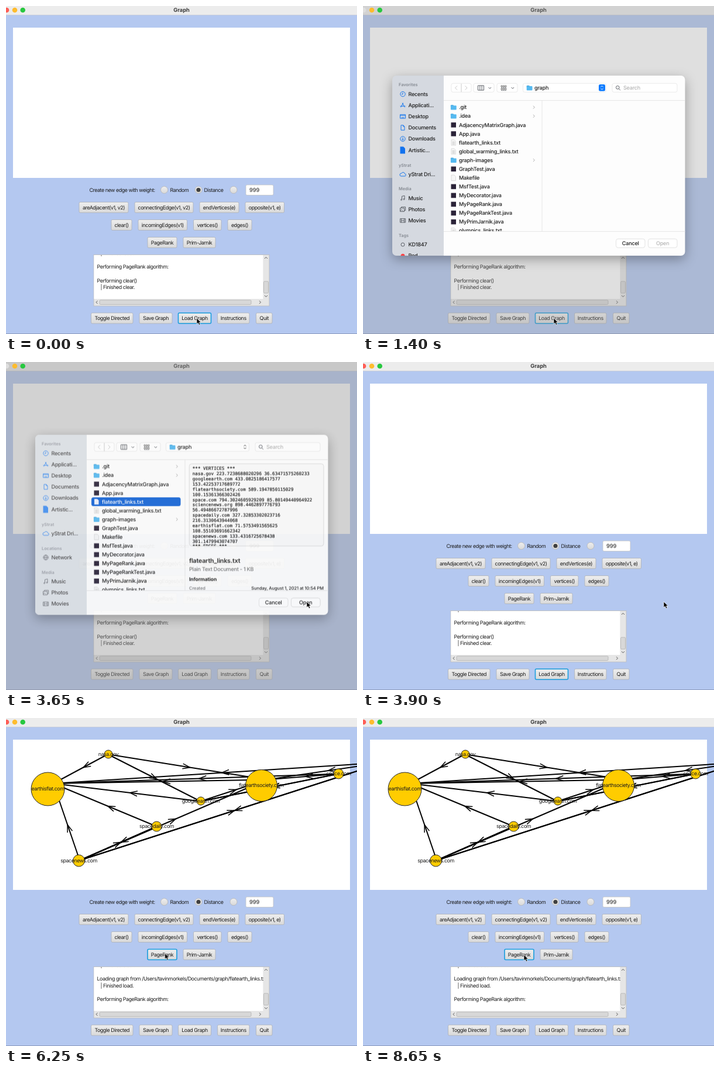
Recreate the animation shown at these times as an HTML page. Size 600 px wide and 561 px high, loop 8.7 s.

```html
<!DOCTYPE html>
<html lang="en">
<head>
<meta charset="utf-8">
<title>Graph</title>
<style>
html, body { margin: 0; width: 100%; height: 100%; overflow: hidden; background: #b4c8f0; }
svg { display: block; width: 600px; height: 561px; }
text { font-family: Inter, Roboto, sans-serif; text-rendering: geometricPrecision; white-space: pre; fill: #1c1c1c; }
.ui { font-size: 8.9px; letter-spacing: -.45px; }
.mac { font-size: 9.1px; letter-spacing: -.25px; font-weight: 500; }
.field { font-size: 9.3px; }
.title { font-size: 9.3px; font-weight: 700; fill: #3c3c3c; }
.head { font-size: 7.3px; font-weight: 600; fill: #858a92; }
.mono { font: 7.55px "DejaVu Sans Mono", "Liberation Mono", monospace; fill: #111; stroke: #111; stroke-width: .18; }
.name { font-size: 10.5px; font-weight: 700; letter-spacing: -.2px; fill: #333; }
.info { font-size: 8.5px; font-weight: 700; letter-spacing: -.1px; }
.small { font-size: 7.5px; letter-spacing: -.1px; font-weight: 500; }
.grey { fill: #777; }
.pale { fill: #b4b4b4; }
.white { fill: #fff; }
.blue { fill: none; stroke: #1677ee; }
.dark { fill: none; stroke: #5c6067; }
.edge { fill: none; stroke: #000; stroke-width: 2; }
.barb { fill: none; stroke: #000; stroke-width: 1.5; }
.node { fill: #ffcc00; stroke: #222; stroke-width: 1; }

#cursor, #dialog, #dim, #pane, #close, #loadFocus, #rankFocus, #log, #edges, #plain, #ranked,
#network, #media, #picked, #active, #inactive, #openOn {
  animation: 8.7s step-end infinite;
}
#dialog { animation-name: sheet; animation-timing-function: linear; filter: drop-shadow(0 6px 10px rgba(0,0,0,.32)); }
#dim { animation-name: dim; animation-timing-function: linear; }
#pane { animation-name: pane; animation-timing-function: linear; }
#cursor { animation-name: cursor; animation-timing-function: ease-in-out; }
#close { animation-name: close; }
#loadFocus { animation-name: loadFocus; }
#rankFocus, #ranked { animation-name: ranked; }
#plain { animation-name: plain; }
#edges { animation-name: loaded; }
#log { animation-name: log; }
#network { animation-name: network; }
#media { animation-name: media; }
#picked { animation-name: picked; }
#openOn { animation-name: openOn; }
#active { animation-name: active; }
#inactive { animation-name: inactive; }

@keyframes sheet {
  0%, 13.218% { opacity: 0; transform: translateY(-18px); }
  16.092% { opacity: 1; transform: translateY(-8px); }
  18.391%, 41.379% { opacity: 1; transform: none; }
  41.954% { opacity: .91; transform: translateY(-2.5px); }
  44.253%, 100% { opacity: 0; transform: translateY(-12.5px); }
}
@keyframes dim {
  0%, 13.218% { opacity: 0; }
  18.391%, 41.379% { opacity: .54; }
  44.253%, 100% { opacity: 0; }
}
@keyframes pane { 0%, 41.379% { opacity: 1; } 44.253%, 100% { opacity: 0; } }
@keyframes cursor {
  0%, 17.241% { transform: translate(326px, 534px); }
  26.437%, 31.034% { transform: translate(217px, 244px); }
  39.08%, 45.977% { transform: translate(514px, 410px); }
  55.172%, 62% { transform: translate(272px, 403px); }
  72.414% { transform: translate(271.5px, 402.5px); }
  78%, 99.5% { transform: translate(275px, 405px); }
  100% { transform: translate(326px, 534px); }
}
@keyframes close { 0% { fill: #ff5f57; } 13.218% { fill: #dedede; } 44.253%, 100% { fill: #ff5f57; } }
@keyframes loadFocus { 0% { opacity: 1; } 16.667% { opacity: 0; } 44.253% { opacity: 1; } 63.218%, 100% { opacity: 0; } }
@keyframes loaded { 0% { opacity: 0; } 45.402%, 100% { opacity: 1; } }
@keyframes plain { 0% { opacity: 0; } 45.402% { opacity: 1; } 63.218%, 100% { opacity: 0; } }
@keyframes ranked { 0% { opacity: 0; } 63.218%, 100% { opacity: 1; } }
@keyframes log {
  0% { transform: none; }
  45.402% { transform: translateY(-35.1px); }
  63.218%, 100% { transform: translateY(-58.5px); }
}
@keyframes network { 0% { opacity: 0; } 20.69%, 100% { opacity: 1; } }
@keyframes media { 0% { transform: translateY(-41.3px); } 20.69%, 100% { transform: none; } }
@keyframes picked { 0% { opacity: 0; } 30.115%, 100% { opacity: 1; } }
@keyframes openOn { 0% { opacity: 0; } 30.115% { opacity: 1; } 41.379%, 100% { opacity: 0; } }
@keyframes active { 0% { opacity: 1; } 41.379%, 100% { opacity: 0; } }
@keyframes inactive { 0% { opacity: 0; } 41.379%, 100% { opacity: 1; } }
</style>
</head>
<body>
<svg viewBox="0 0 600 561">
  <defs>
    <linearGradient id="btn" x2="0" y2="1"><stop stop-color="#eeeeee"/><stop offset="1" stop-color="#d9d9d9"/></linearGradient>
    <clipPath id="logClip"><rect x="150.5" y="426" width="289" height="75"/></clipPath>
    <clipPath id="sheetClip"><rect x="50" y="127" width="500.5" height="308" rx="7"/></clipPath>
    <clipPath id="listClip"><rect x="138" y="170" width="168" height="223"/></clipPath>
    <clipPath id="previewClip"><rect x="313" y="177" width="230" height="140"/></clipPath>
  </defs>

  <rect width="600" height="561" fill="#b4c8f0"/>
  <rect width="600" height="15.5" fill="#ececec"/>
  <rect y="15.2" width="600" height=".8" fill="#c4cbd9"/>
  <rect y="560" width="600" height="1" fill="#8c9bbd"/>
  <rect x="12" y="37" width="576" height="257" fill="#fff"/>
  <g id="edges"></g>
  <g id="plain"></g>
  <g id="ranked"></g>
  <g id="controls"></g>
  <rect id="loadFocus" x="294.5" y="525" width="56" height="18" rx="2" fill="none" stroke="#1a9fe0" stroke-width="1.6"/>
  <rect id="rankFocus" x="242" y="395.5" width="50" height="18" rx="2" fill="none" stroke="#1a9fe0" stroke-width="1.6"/>

  <rect x="150" y="425.5" width="300" height="87.5" fill="#e6e6e6" stroke="#bcbcbc" stroke-width=".8"/>
  <rect x="150.4" y="426" width="289" height="75" fill="#fff"/>
  <g clip-path="url(#logClip)"><g id="log"></g></g>
  <g fill="#d8d8d8" stroke="#b0b0b0" stroke-width=".8">
    <rect x="440.5" y="471" width="8" height="20" rx="1.5"/>
    <rect x="160" y="503" width="259" height="7.5" rx="1.5"/>
  </g>
  <path d="M442 432l2.500-2.500 2.500 2.500M442 495l2.500 2.500 2.500-2.500M156.500 504.200l-2.500 2.500 2.500 2.500M433 504.200l2.500 2.500-2.500 2.500" fill="none" stroke="#555"/>

  <rect id="dim" width="600" height="561" fill="#969696"/>
  <circle id="close" cx="1" cy="7" r="4.3"/>
  <circle cx="15" cy="7" r="4.3" fill="#febc2e"/>
  <circle cx="28.7" cy="7" r="4.3" fill="#28c840"/>

  <g id="dialog"><g clip-path="url(#sheetClip)">
    <rect x="50" y="127" width="501" height="308" fill="#fdfdfd"/>
    <g id="pane">
      <rect x="50" y="127" width="88" height="308" fill="#d5d9e0"/>
      <g id="sidebar"></g>
      <g id="network"></g>
      <g id="media"></g>
    </g>
    <path d="M138 169.500H551M138 393.500H551M306 169.500V393.500" stroke="#e0e0e0" stroke-width=".8"/>
    <g id="toolbar"></g>
    <g id="picked"></g>
    <g id="files" clip-path="url(#listClip)"></g>
    <g id="active">
      <rect x="403" y="142" width="11" height="11.500" rx="2.500" fill="#0a7aff"/>
      <path d="M406.500 146.500l2-2 2 2M406.500 149l2 2 2-2" fill="none" stroke="#fff"/>
    </g>
    <g id="openOn"></g>
    <g id="inactive"><path d="M406.500 146.500l2-2 2 2M406.500 149l2 2 2-2" fill="none" stroke="#333"/></g>
  </g></g>

  <path id="cursor" d="M0 0v10l2.400-2.200 1.700 3.700 1.900-.9-1.700-3.500h3.100z" fill="#000" stroke="#fff" stroke-width=".7"/>
</svg>

<script>
const $ = id => document.getElementById(id);

function add(parent, tag, attrs, content) {
  const node = document.createElementNS("http://www.w3.org/2000/svg", tag);
  for (const key in attrs) node.setAttribute(key, attrs[key]);
  if (content) node.textContent = content;
  parent.append(node);
  return node;
}
const rect = (p, x, y, width, height, rx, fill, stroke = "none") =>
  add(p, "rect", { x, y, width, height, rx, fill, stroke, "stroke-width": .8 });
const path = (p, d, cls) => add(p, "path", { d, class: cls });
// y is the middle of the line
const text = (p, x, y, s, cls = "ui", anchor = "start") =>
  add(p, "text", { x, y: y + 3.2, class: cls, "text-anchor": anchor }, s);

// Main window controls
const controls = $("controls");
text(controls, 300, 6.8, "Graph", "title", "middle");
text(controls, 142.5, 314.5, "Create new edge with weight:");
text(controls, 280.5, 314.5, "Random");
text(controls, 338.5, 314.5, "Distance");
for (const cx of [270.5, 329, 389])
  add(controls, "circle", { cx, cy: 314.5, r: 6, fill: "url(#btn)", stroke: "#b5b5b5", "stroke-width": .8 });
add(controls, "circle", { cx: 329, cy: 314.5, r: 3.6, fill: "#3f3f3f" });
rect(controls, 410, 306, 47, 17.5, 2, "#fff", "#c4c4c4");
text(controls, 416, 314.5, "999", "field");

const rows = {
  344.5: [["areAdjacent(v1, v2)", 125, 209], ["connectingEdge(v1, v2)", 220, 320], ["endVertices(e)", 331, 398], ["opposite(v1, e)", 409, 475.5]],
  374.5: [["clear()", 180, 215], ["incomingEdges(v1)", 226, 309.5], ["vertices()", 320.5, 368], ["edges()", 379, 420]],
  404.5: [["PageRank", 242, 292], ["Prim-Jarnik", 303, 358]],
  534: [["Toggle Directed", 145.5, 217], ["Save Graph", 228, 284], ["Load Graph", 294.5, 350.5], ["Instructions", 361.5, 416], ["Quit", 427.5, 455]]
};
for (const y in rows) for (const [label, x1, x2] of rows[y]) {
  rect(controls, x1, y - 9, x2 - x1, 18, 2, "url(#btn)", "#adb0b6");
  text(controls, (x1 + x2) / 2, +y, label, "ui", "middle");
}

["| Finished load.", "", "Performing PageRank algorithm:", "", "Performing clear()", "| Finished clear.", "",
 "Loading graph from /Users/tavinmorkels/Documents/graph/flatearth_links.txt", "| Finished load.", "",
 "Performing PageRank algorithm:"
].forEach((line, i) => text($("log"), line[0] === "|" ? 161.5 : 155.5, 422.6 + i * 11.7, line));

// Graph: label, then x, y, radius before and after ranking
const nodes = {
  N: ["nasa.gov", 174, 62, 8, 175, 62, 7],
  G: ["googleearth.com", 332.5, 142.5, 8, 333, 142, 7],
  F: ["flatearthsociety.com", 445.5, 105.5, 8, 436.5, 115.5, 27],
  S: ["space.com", 568.5, 95.5, 8, 568.5, 95.5, 8.5],
  D: ["spacedaily.com", 257.5, 185.5, 8, 257.5, 185.5, 8.5],
  E: ["earthisflat.com", 81, 112, 8, 71.5, 121.5, 28.5],
  W: ["spacenews.com", 126, 243.5, 8, 124.5, 244, 10],
  X: ["sciencenews.org", 646, 76, 8, 646, 76, 8]
};
for (const [from, to] of "NE NF NG GE DE WE FE SE XE GF GS SG WF WD DW WX XW SF XF".split(" ")) {
  const [, ax, ay] = nodes[from], [, bx, by] = nodes[to];
  const angle = Math.atan2(by - ay, bx - ax);
  const shift = bx > ax ? 5 : -5;
  const tx = (ax + bx) / 2 + shift * Math.cos(angle), ty = (ay + by) / 2 + shift * Math.sin(angle);
  const barb = turn => `${tx - 13.5 * Math.cos(angle + turn)} ${ty - 13.5 * Math.sin(angle + turn)}`;
  path($("edges"), `M${ax} ${ay}L${bx} ${by}`, "edge");
  path($("edges"), `M${barb(.33)}L${tx} ${ty}L${barb(-.33)}`, "barb");
}
for (const [group, at] of [["plain", 1], ["ranked", 4]])
  for (const node of Object.values(nodes)) {
    const [cx, cy, r] = node.slice(at);
    add($(group), "circle", { cx, cy, r, class: "node" });
    text($(group), cx, cy - .5, node[0], "ui", "middle");
  }

// Sidebar: icon paths are drawn around the item's centre
const icons = {
  clock: "M-4.200 0a4.200 4.200 0 1 0 8.400 0a4.200 4.200 0 1 0-8.400 0M0-2.500V.3H-2",
  apps: "M-3.500 3.500L.8-4M3.500 3.500L-.8-4M-4.500 1.500H4.500",
  desk: "M-4.500-3.200h9v6.400h-9zM-4.500-1.700h9M-2.500 2h5",
  page: "M-3-4.200h3.800L3-2v6.200h-6zM.8-4.200V-2H3",
  down: "M-4.200 0a4.200 4.200 0 1 0 8.400 0a4.200 4.200 0 1 0-8.400 0M0-2.300v4.400M-1.800.5L0 2.300 1.800.5",
  cloud: "M-3 3.200h6a2 2 0 0 0 .5-4a3 3 0 0 0-5.700-.8a2.400 2.400 0 0 0-.8 4.800z",
  globe: "M-4.200 0a4.200 4.200 0 1 0 8.400 0a4.200 4.200 0 1 0-8.400 0M-4.200 0h8.400M0-4.200q-4 4.200 0 8.400q4-4.200 0-8.400",
  note: "M-1.500 2.700v-6l4.500-1v6M-3.500 2.700a1 1 0 1 0 2 0a1 1 0 1 0-2 0M1 1.700a1 1 0 1 0 2 0a1 1 0 1 0-2 0",
  photo: "M-4.500-2.200h7v6h-7zM-2.500-2.200v-1.800h7v6h-2M-4.500 2.500l2.500-2 2 2",
  film: "M-4.500-3.200h9v6.400h-9zM-2.500-3.200v6.400M2.500-3.200v6.400M-2.500 0h5",
  ring: "M-3 0a3 3 0 1 0 6 0a3 3 0 1 0-6 0"
};
function item(p, y, label, icon, cls = "blue") {
  path(p, icons[icon], cls).setAttribute("transform", `translate(68 ${y})`);
  text(p, 77.5, y, label, "mac");
}
const side = $("sidebar"), media = $("media");
text(side, 61, 142, "Favorites", "head");
["Recents clock", "Applicati... apps", "Desktop desk", "Documents page", "Downloads down", "Artistic... page"].forEach((s, i) => {
  const [label, icon] = s.split(" ");
  item(side, 158.6 + i * 19.15, label, icon);
});
path(side, "M63.500 248.500h5.500l3 3v9h-8.500z", "").setAttribute("fill", "#1272ee");
text(side, 61, 279.3, "yStrat", "head");
item(side, 295.8, "yStrat Dri...", "cloud");
text($("network"), 61, 320.8, "Locations", "head");
item($("network"), 336.8, "Network", "globe", "dark");
text(media, 61, 361.5, "Media", "head");
item(media, 378, "Music", "note", "dark");
item(media, 397, "Photos", "photo", "dark");
item(media, 416.2, "Movies", "film", "dark");
text(media, 61, 441, "Tags", "head");
item(media, 457.3, "KD1847", "ring", "dark");
text(media, 77.5, 476, "Red", "mac");
add(media, "circle", { cx: 68, cy: 476.5, r: 3.5, fill: "#ff4245" });

// Dialog toolbar and buttons
function folder(p, x, y) {
  rect(p, x - 4.8, y - 4, 5, 3, 1, "#3c9fd8");
  rect(p, x - 4.8, y - 3, 9.8, 7.3, 1, "#55b9f0");
}
const bar = $("toolbar");
for (const [x, w] of [[151, 34], [189, 35], [229, 35], [273.5, 142], [426, 111]])
  rect(bar, x, 140.3, w, 15, 3, "#fff", "#e6e6e6");
path(bar, "M161 144.500l-3.500 3.500 3.500 3.500M174.500 144.500l3.500 3.500-3.500 3.500M168 141v14", "").setAttribute("style", "fill:none;stroke:#c9c9c9");
path(bar, "M196.500 144h10v8h-10zM199.800 144v8M203.200 144v8M214.500 147l2.300 2.300 2.300-2.300M253.500 147l2.300 2.300 2.300-2.300", "dark");
for (let i = 0; i < 6; i++) rect(bar, 236 + i % 3 * 3.4, 144 + (i > 2) * 4.8, 2.1, 2.4, .3, "#fff", "#555");
path(bar, "M236 147.700h9M236 152.500h9", "dark").setAttribute("stroke-width", .6);
folder(bar, 284.5, 148);
text(bar, 293, 147.8, "graph", "mac");
path(bar, "M432.500 147.300a2.800 2.800 0 1 0 5.600 0a2.800 2.800 0 1 0-5.600 0M437.300 149.500l2.600 2.600", "dark");
text(bar, 445, 148, "Search", "mac pale");

function button(p, x, label, cls, fill = "#fff") {
  rect(p, x, 406.3, 49.5, 15, 3.5, fill, "#dcdcdc");
  text(p, x + 24.7, 414, label, "mac " + cls, "middle");
}
button(bar, 432.5, "Cancel", "");
button(bar, 487.5, "Open", "pale");
button($("openOn"), 487.5, "Open", "white", "#0a7aff");
button($("inactive"), 487.5, "Open", "");

// File column
const files = $("files");
const rowY = i => 181.2 + i * 15.07;
[".git", ".idea", "AdjacencyMatrixGraph.java", "App.java", "flatearth_links.txt", "global_warming_links.txt", "graph-images",
 "GraphTest.java", "Makefile", "MsfTest.java", "MyDecorator.java", "MyPageRank.java", "MyPageRankTest.java",
 "MyPrimJarnik.java", "olympics_links.txt"
].forEach((name, i) => {
  const y = rowY(i);
  if (name.endsWith(".java")) rect(files, 150.5, y - 4.2, 8.5, 8.5, 0, "#2b2338");
  else if (/txt$|^M/.test(name)) {
    path(files, `M151 ${y - 4.700}h5l2.500 2.500v7h-7.500z`, "").setAttribute("style", "fill:#f6f6f6;stroke:#d2d2d2;stroke-width:.7");
    if (name.endsWith("txt"))
      path(files, `M152.500 ${y - 1}h4.500M152.500 ${y + 1}h4.500M152.500 ${y + 3}h4.500`, "").setAttribute("style", "stroke:#b9b9b9;stroke-width:.7");
  } else {
    folder(files, 154.7, y);
    path(files, `M291 ${y - 2.500}l2.300 2.500-2.300 2.500`, "").setAttribute("style", "fill:none;stroke:#9a9a9a;stroke-width:.8");
  }
  text(files, 164, y, name, "mac");
});

// Selected row and preview
const picked = $("picked");
rect(picked, 146, 233.9, 152.500, 15, 3.5, "#1263d6");
files.after(picked);
path(picked, "M151 236.700h5l2.500 2.500v7h-7.500z", "").setAttribute("fill", "#e9eefb");
text(picked, 164, rowY(4), "flatearth_links.txt", "mac white");
rect(picked, 313.3, 176.700, 229.700, 140.500, 4, "#fafafa", "#d4d4d4");
const preview = add(picked, "g", { "clip-path": "url(#previewClip)" });
`*** VERTICES ***
nasa.gov 223.7238688020296 36.63471575260233
googleearth.com 433.0825186417577
153.42253717689772
flatearthsociety.com 589.1947850115029
100.15361366302426
space.com 794.3024605929209 85.80149440964922
sciencenews.org 898.4462897776793
56.49486672787996
spacedaily.com 327.32853302023716
216.3130643944068
earthisflat.com 71.5753491565625
108.55103691662342
spacenews.com 133.4316725678438
301.1479943074707
*** EDGES ***`.split("\n").forEach((line, i) => text(preview, 318.8, 184.2 + i * 8.87, line, "mono"));
text(picked, 313, 342.8, "flatearth_links.txt", "name");
text(picked, 313, 356.8, "Plain Text Document - 1 KB", "mac grey");
text(picked, 313, 373.3, "Information", "info");
text(picked, 313, 388.3, "Created", "small grey");
text(picked, 543, 388.3, "Sunday, August 1, 2021 at 10:54 PM", "small", "end");
</script>
</body>
</html>
```
